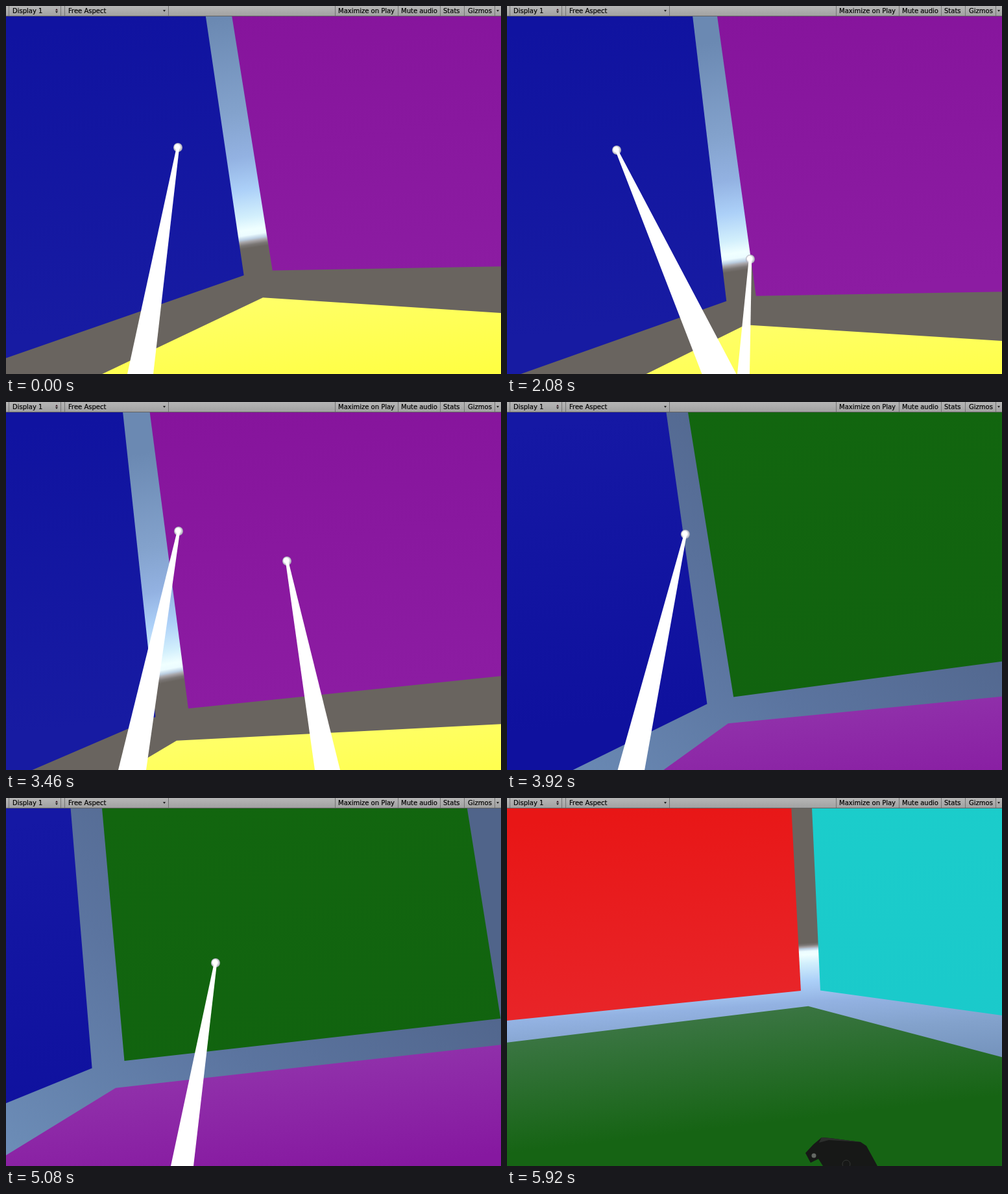
Animation of 763 by 567 pixels, one loop 6000 ms. Source, as an HTML page with a canvas:

```html
<!DOCTYPE html>
<html lang="en">
<head>
<meta charset="utf-8">
<title>Room view</title>
<style>
  html, body { margin: 0; width: 100%; height: 100%; overflow: hidden; background: #69645f; }
  canvas { position: absolute; left: 0; top: 0; }
  .bar {
    position: absolute; left: 0; top: 0; width: 763px; height: 15px;
    background: linear-gradient(#b6b6b6, #a2a2a2); border-bottom: 1px solid #626262;
    font: 10px/15px "DejaVu Sans", sans-serif; color: #000; white-space: pre;
    -webkit-text-stroke: .2px #000;
  }
  .bar span { position: absolute; top: 0; height: 15px; box-sizing: border-box; border-left: 1px solid #747474; padding-left: 5px; }
  .bar i { position: absolute; border: solid transparent; border-width: 0 2.5px; }
  .bar .down { border-top: 3px solid #222; }
  .bar .up { border-bottom: 3px solid #40202c; }
</style>
</head>
<body>
<canvas width="763" height="567"></canvas>
<div class="bar">
  <span style="left:4px">Display 1</span>
  <span style="left:84px"></span>
  <span style="left:90px">Free Aspect</span>
  <span style="left:250px"></span>
  <span style="left:507px; padding-left:4px">Maximize on Play</span>
  <span style="left:604px; padding-left:4px">Mute audio</span>
  <span style="left:669px; padding-left:4px">Stats</span>
  <span style="left:706px">Gizmos</span>
  <span style="left:753px"></span>
  <i class="up" style="left:76px; top:4px"></i>
  <i class="down" style="left:76px; top:8px"></i>
  <i class="down" style="left:242px; top:6px"></i>
  <i class="down" style="left:756px; top:6px"></i>
</div>
<script>
const W = 763, H = 567, TOP = 16, CX = W / 2, CY = (TOP + H) / 2;
const LOOP = 6000, STEPS = 78;
const FOCAL = 420, GAP = .054, ROOM = 1 + 2 * GAP, NEAR = .01;
const g = document.querySelector('canvas').getContext('2d');

// step, then yaw (to the left), pitch (up) and roll of the head in degrees
const head = [
  [0, 40.3, 6.6, 8.9], [14, 36.5, 9, 8], [27, 36.2, 10.9, 8.4], [45, 22.2, 11.1, 10.7],
  [58, 14.1, 11.3, 9.9], [66, .5, 2.9, 6.5], [77, -16.9, -4.8, 3.8]
];

// step, tip x, tip y, base x, base width
const leftRay = [
  [0, 265, 218, 207, 40], [14, 304, 274, 260.5, 33], [27, 169, 222, 327, 53], [45, 266, 199, 194.5, 43],
  [58, 281, 219, 214, 40], [66, 323, 254, 271.5, 35], [72, 405, 300, 400, 36]
];
const rightRay = [[14, 419, 238, 506.5, 39], [27, 375, 390, 364.5, 19], [45, 433, 245, 495.5, 39]];

// Each jump puts the viewer on another wall; eye = distance to the left wall, the wall ahead, the floor.
// sky: 1 upright, -1 upside down, 0 lying on its side
const blue = ['#1013a0', '#171ba2'], cyan = ['#1bcdcb', '#1ac9cb'];
const scenes = [
  { from: 0, eye: [.517, .575, .174], sky: 1, reach: 1,
    left: blue, ahead: ['#86149c', '#8c1ca2'], right: cyan, floor: ['#ffff68', '#ffff3e'] },
  { from: 48, eye: [.424, .729, .173], sky: 0,
    left: ['#1518a4', '#0f119e'], ahead: ['#12660f', '#11630f'], right: cyan, floor: ['#9030aa', '#8618a0'] },
  { from: 72, eye: [.574, .961, .169], sky: -1, reach: .65,
    left: blue, ahead: ['#e81616', '#e82c32'], right: cyan, floor: ['#3a7542', '#166414'] }
];

// distance from the edge of the ground and colour there
const skyBands = [
  [-10, '#69645f'], [-5, '#7a7674'], [0, '#a6a3a6'], [4, '#bccfe2'], [10, '#ecfcff'], [18, '#f0ffff'],
  [38, '#d2effc'], [80, '#acd0f8'], [130, '#93b2e2'], [200, '#83a2cc'], [345, '#6b89b2']
];

// Smooth curve through the keys, with slopes taken from the neighbours
function pose(keys, step) {
  const last = keys.length - 1;
  if (step <= keys[0][0]) return keys[0].slice(1);
  if (step >= keys[last][0]) return keys[last].slice(1);
  const i = keys.findIndex((k, n) => step < keys[n + 1][0]);
  const a = keys[i], b = keys[i + 1], before = keys[Math.max(i - 1, 0)], after = keys[Math.min(i + 2, last)];
  const span = b[0] - a[0], s = (step - a[0]) / span;
  return a.slice(1).map((p, n) => {
    const c = n + 1, q = b[c];
    const m0 = (q - before[c]) / (b[0] - before[0]) * span;
    const m1 = (after[c] - p) / (after[0] - a[0]) * span;
    return p + s * (m0 + s * (3 * (q - p) - 2 * m0 - m1 + s * (m0 + m1 - 2 * (q - p))));
  });
}

const dot = (u, v) => u[0] * v[0] + u[1] * v[1] + u[2] * v[2];
const mix = (u, v, s) => u.map((p, i) => p + (v[i] - p) * s);

// Screen axes (right, down, forward) in room axes (right, down, ahead)
function axes(step) {
  const [yaw, pitch, roll] = pose(head, step).map(d => d * Math.PI / 180);
  const { sin, cos } = Math;
  const side = [cos(yaw), 0, sin(yaw)];
  const under = [-sin(yaw) * sin(pitch), cos(pitch), cos(yaw) * sin(pitch)];
  return [
    side.map((p, i) => p * cos(roll) + under[i] * sin(roll)),
    side.map((p, i) => under[i] * cos(roll) - p * sin(roll)),
    [-sin(yaw) * cos(pitch), -sin(pitch), cos(yaw) * cos(pitch)]
  ];
}

function shape(fill, points) {
  g.fillStyle = fill;
  g.beginPath();
  points.forEach(p => g.lineTo(...p));
  g.fill();
}

function blend(x0, y0, x1, y1, stops) {
  const fill = g.createLinearGradient(x0, y0, x1, y1);
  stops.forEach((c, i) => fill.addColorStop(i / (stops.length - 1), c));
  return fill;
}

const toScreen = ([x, y, z]) => [CX + FOCAL * x / z, CY + FOCAL * y / z];

// Room corners to screen points, cut off behind the viewer
function project(corners, view) {
  const points = corners.map(c => view.map(axis => dot(axis, c)));
  const out = [];
  points.forEach((p, i) => {
    const q = points[(i + 1) % points.length];
    if (p[2] > NEAR) out.push(toScreen(p));
    if ((p[2] > NEAR) !== (q[2] > NEAR)) out.push(toScreen(mix(p, q, (NEAR - p[2]) / (q[2] - p[2]))));
  });
  return out;
}

function drawSky({ sky, reach }, view) {
  if (!sky) {
    g.fillStyle = blend(0, H, 480, TOP, ['#6d8eb8', '#5b749f', '#50648a']);
  } else {
    const [nx, ny, nz] = view.map(axis => axis[1]);
    const len = Math.hypot(nx, ny), offset = -FOCAL * nz / len + sky * 21;
    const at = d => {
      const r = offset - sky * d * reach;
      return [CX + nx / len * r, CY + ny / len * r];
    };
    const near = skyBands[0][0], far = skyBands[skyBands.length - 1][0];
    const fill = g.createLinearGradient(...at(near), ...at(far));
    skyBands.forEach(([d, c]) => fill.addColorStop((d - near) / (far - near), c));
    g.fillStyle = fill;
  }
  g.fillRect(0, TOP, W, H - TOP);
}

function drawRoom(scene, view) {
  const [left, ahead, height] = scene.eye;
  const x0 = GAP - left, x1 = x0 + 1, y0 = height - GAP, y1 = y0 - 1, z0 = ahead - GAP, z1 = z0 - 1;
  const sideWall = x => [[x, y0, z0], [x, y1, z0], [x, y1, z1], [x, y0, z1]];
  const wall = (corners, colors) => shape(blend(200, TOP, 260, 480, colors), project(corners, view));
  drawSky(scene, view);
  wall(sideWall(-left), scene.left);
  wall(sideWall(ROOM - left), scene.right);
  wall([[x0, y0, ahead], [x1, y0, ahead], [x1, y1, ahead], [x0, y1, ahead]], scene.ahead);

  const floor = project([[x0, height, z0], [x1, height, z0], [x1, height, z1], [x0, height, z1]], view);
  const edge = scene.sky < 0 ? floor[1] : floor[0];
  shape(blend(edge[0], edge[1], edge[0] + 20, edge[1] + 170, scene.floor), floor);
}

function drawRay(keys, step, miss) {
  const [x, y, base, width] = pose(keys, step);
  if (!miss) {
    const ball = g.createRadialGradient(x - 1.5, y - 1.5, 1, x, y, 7.5);
    ball.addColorStop(.4, '#fff');
    ball.addColorStop(1, '#9494a6');
    g.fillStyle = ball;
    g.beginPath();
    g.arc(x, y, 7, 0, 7);
    g.fill();
  }
  const tip = miss ? .7 : 2.2;
  shape(miss ? '#f00' : '#fff', [[x - tip, y], [x + tip, y], [base + width / 2, H], [base - width / 2, H]]);
}

function drawController(rise) {
  g.save();
  g.translate(0, (1 - rise) * 50);
  shape('#171817', [[460, 547], [472, 534], [485, 523], [498, 524], [545, 530], [554, 536],
    [571, 567], [574, 620], [495, 620], [487, 567], [480, 556], [468, 562]]);
  shape('#2c2e2c', [[485, 523], [498, 524], [545, 530], [496, 527], [481, 531]]);
  g.fillStyle = '#646864';
  g.beginPath();
  g.arc(473, 551, 3.5, 0, 7);
  g.fill();
  g.strokeStyle = '#343634';
  g.beginPath();
  g.arc(523, 564, 6, 0, 7);
  g.stroke();
  g.restore();
}

const start = performance.now();
function run() {
  const time = (performance.now() - start + 4) % LOOP;
  const step = Math.floor(time / LOOP * STEPS);
  const [, first, second] = scenes;
  drawRoom(scenes.filter(s => step >= s.from).pop(), axes(step));
  if (step >= 7 && step < first.from) drawRay(rightRay, step);
  if (step < second.from) drawRay(leftRay, step, step >= 54 && step < 61);
  else drawController(Math.min(1, (step - second.from + 1) / 5));
  requestAnimationFrame(run);
}
run();
</script>
</body>
</html>
```
